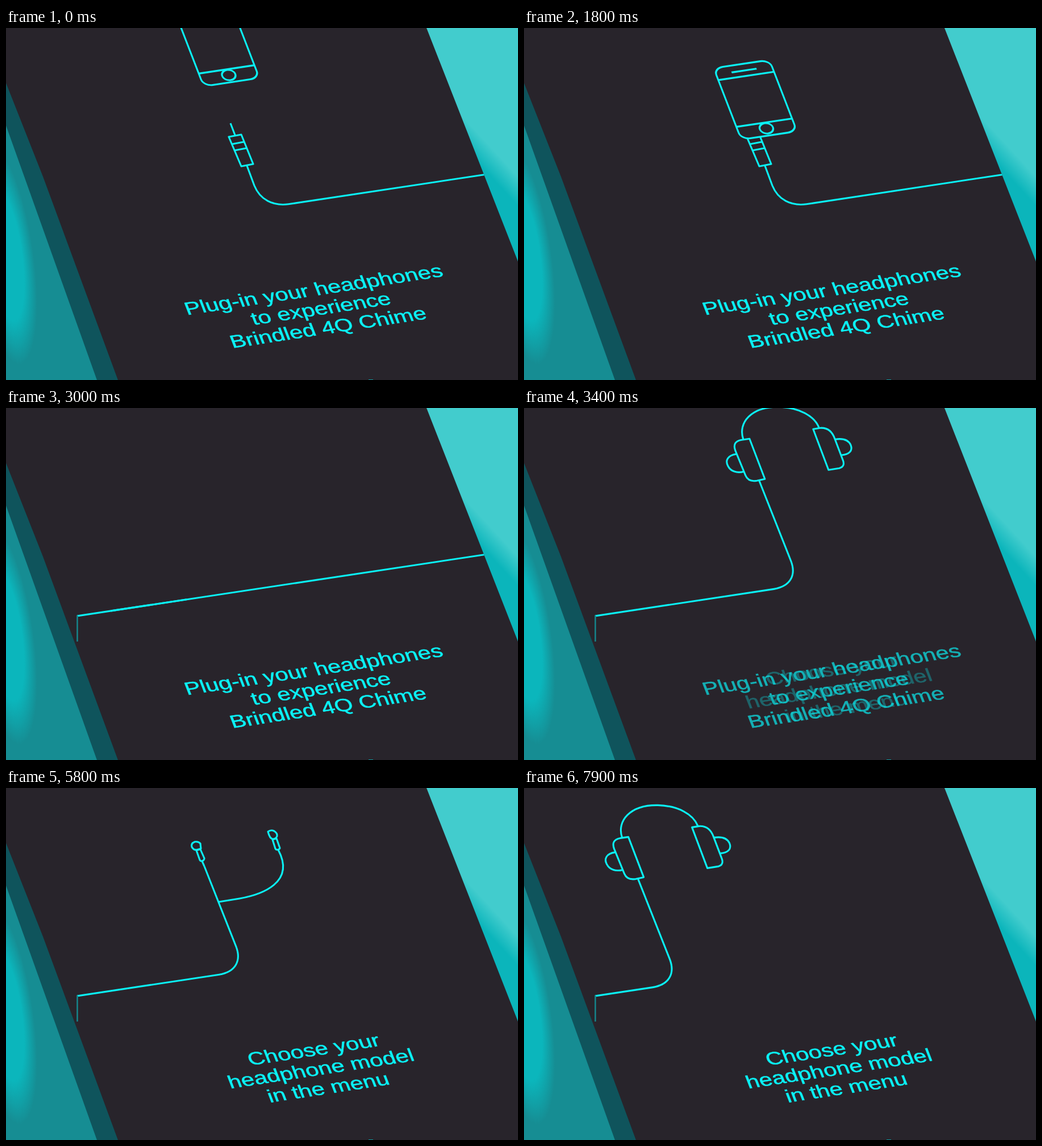
Animation, 901 px wide and 621 px high, one loop 8000 ms. Source, as an HTML page:

```html
<!DOCTYPE html>
<html lang="en">
<head>
<meta charset="utf-8">
<title>Headphone setup</title>
<style>
html, body { margin: 0; width: 100%; height: 100%; overflow: hidden; background: #168d93; }
svg { display: block; width: 901px; height: 621px; }
.line { fill: none; stroke: #0bf1f5; stroke-width: 3.1; stroke-linejoin: round; }
text { font: 40.7px "Liberation Sans", Arial, sans-serif; text-anchor: middle; fill: #0bf1f5; stroke: #0bf1f5; stroke-width: .7; }
</style>
</head>
<body>
<svg viewBox="0 0 901 621">
  <defs>
    <linearGradient id="sky" gradientUnits="userSpaceOnUse" x1="806" y1="159" x2="780" y2="183">
      <stop offset="0" stop-color="#42cccd"/><stop offset="1" stop-color="#0bb5bb"/>
    </linearGradient>
    <radialGradient id="glow">
      <stop offset=".6" stop-color="#0bb6bc"/><stop offset="1" stop-color="#0bb6bc" stop-opacity="0"/>
    </radialGradient>
    <clipPath id="view"><path d="M20 0V125L125 366V450H901V412L740 0Z"/></clipPath>
  </defs>

  <path fill="#168d93" d="M0 0H901V621H0Z"/>
  <ellipse rx="50" ry="195" transform="translate(-2 400) rotate(-8)" fill="url(#glow)"/>
  <path fill="#0f545c" d="M0 90V172L160 621H220Z"/>
  <path fill="url(#sky)" d="M730 0H901V430Z"/>
  <path fill="#28242b" d="M0 0H740L901 412V621H197L65 262L0 97Z"/>
  <path fill="#0e9aa0" d="M638 620h8v1h-8z"/>

  <g class="line" clip-path="url(#view)">
    <g id="player">
      <path d="M395 168L403 189M392 192L414 188L435 240L414 244ZM397 205L418 201M402 216L423 212M424 243L437 278C447 303 470 314.5 497 310.8L1500 159.3"/>
      <g id="phone">
        <g transform="matrix(1 -.15 .385 1 0 0)">
          <rect x="-49" y="-113.5" width="98" height="126" rx="16" ry="12" fill="#28242b"/>
          <path d="M-49 -92.5H49M-49 -10H49M-22 -102H22"/>
          <ellipse rx="11.5" ry="9"/>
        </g>
      </g>
    </g>
    <g id="listener">
      <path d="M349 138L405 280C414 304 405 324 375 329.2L-300 431.1"/>
      <g class="model">
        <path d="M321 65C311 36 335 7 384 8C420 9 446 24 454 44"/>
        <path d="M332 64L359 135L345 138C334 140 328 136 325 129L307 85C303 74 307 68 318 66Z"/>
        <path d="M309 91C293 93 289 103 294 112C299 122 310 125 322 122"/>
        <path d="M444 47L471 119L490 116C498 114 499 108 496 101L482 64C477 50 468 44 456 45Z"/>
        <path d="M483 65C497 63 506 66 510 75C514 85 508 92 493 93"/>
      </g>
      <g class="model">
        <path d="M322 82C312 50 338 24 386 25C422 26 451 42 460 63"/>
        <path d="M331 80L352 135L342 137Q333 137 330 129L316 93Q313 83 322 82Z"/>
        <path d="M451 65L472 119L493 116Q502 114 499 105L487 74Q482 62 470 62Z"/>
      </g>
      <g class="model">
        <path d="M349 138L345 129M374 201L411 195C450 188 510 167 479 109"/>
        <path d="M342 98Q339 94 332 95Q325 98 327 104Q330 110 336 109L343 107Z"/>
        <path d="M335 110L342 108L349 124Q349 128 344 129Q342 129 341 127Z"/>
        <path d="M461 77Q466 73 472 76Q478 80 477 85Q475 90 469 90Q464 89 461 77Z"/>
        <path d="M469 91L476 89L482 106Q481 109 477 109Q475 109 474 107Z"/>
      </g>
    </g>
  </g>
  <path id="edge" d="M125.5 366V412" stroke="#15868c" stroke-width="2.5"/>

  <g transform="matrix(1 -.152 .289 .75 545 472)">
    <text id="choose"><tspan x="0">Choose your</tspan><tspan x="0" dy="44.5">headphone model</tspan><tspan x="0" dy="44.5">in the menu</tspan></text>
    <text id="plugIn"><tspan x="0">Plug-in your headphones</tspan><tspan x="0" dy="44.5">to experience</tspan><tspan x="0" dy="44.5">Brindled 4Q Chime</tspan></text>
  </g>
</svg>
<script>
const LOOP = 8000, STEP = 100, STRIP = 1667;
const $ = id => document.getElementById(id);
const models = document.querySelectorAll('.model');

const part = (t, start, length) => Math.min(1, Math.max(0, (t - start) / length));
const move = (el, x, y) => el.setAttribute('transform', `translate(${x.toFixed(2)} ${y.toFixed(2)})`);
const slide = (el, x) => move(el, x, -.151 * x);

const slideEase = p => 1 - (1 - p ** 1.75) ** 3.5;
const fadeEase = p => p < .5 ? 4 * p ** 3 : 1 - 4 * (1 - p) ** 3;

// Pulls back a little, then overshoots before settling
function backEase(p) {
  const c = 2.59, half = q => q * q * ((c + 1) * q - c) / 2;
  return p < .5 ? half(2 * p) : 1 - half(2 - 2 * p);
}

function draw(t) {
  const plug = backEase(part(t, 900, 960));
  move($('phone'), 392 + 34 * plug, 83 + 92.5 * plug);

  const arrive = STRIP * slideEase(part(t, 2200, 1600));
  const leave = STRIP * slideEase(part(t, 7700, 1600));
  slide($('player'), -arrive);
  slide($('listener'), STRIP - arrive - leave);

  const shown = t < 4800 || t >= 6800 ? 0 : t < 5800 ? 1 : 2;
  models.forEach((m, i) => m.setAttribute('visibility', i === shown ? 'visible' : 'hidden'));
  $('edge').setAttribute('visibility', t >= 2900 ? 'visible' : 'hidden');

  const fade = fadeEase(part(t, 3100, 700));
  $('plugIn').setAttribute('opacity', 1 - fade);
  $('choose').setAttribute('opacity', fade);
}

const begin = performance.now();
function tick() {
  const t = (performance.now() - begin) % LOOP;
  draw(Math.floor(t / STEP) * STEP);
  requestAnimationFrame(tick);
}
tick();
</script>
</body>
</html>
```
